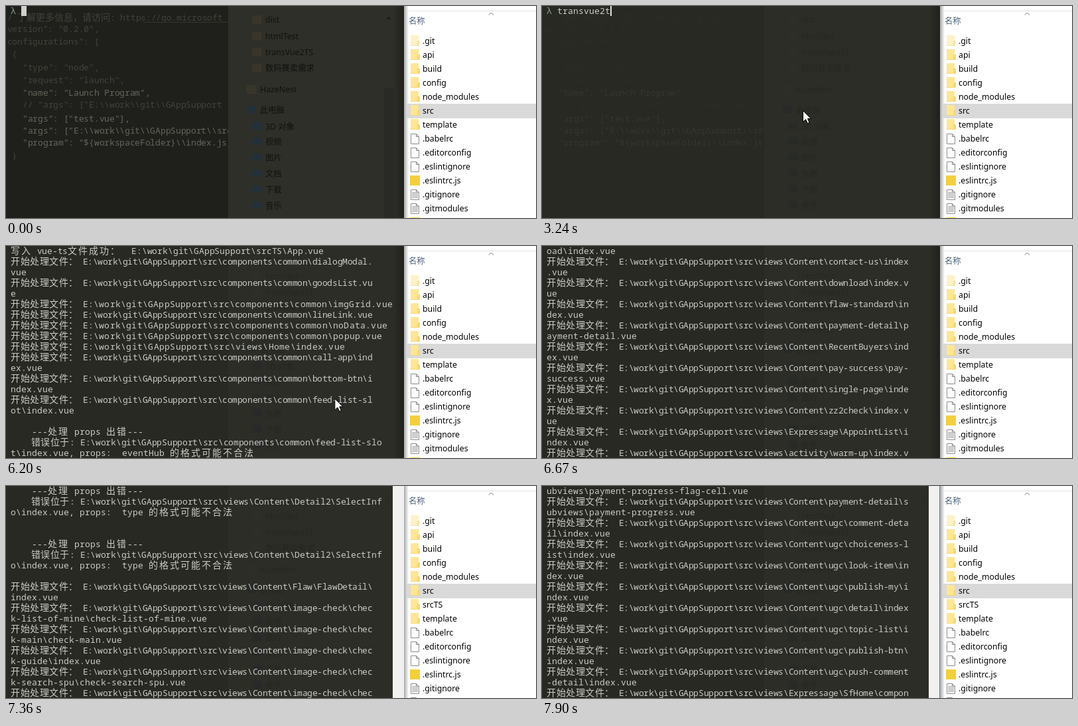
Write an HTML page with a canvas that moves like this. It is 799 px wide and 319 px high and loops after 7990 ms.

```html
<!DOCTYPE html>
<html lang="zh">
<head>
<meta charset="utf-8">
<style>
html, body { margin: 0; width: 100%; height: 100%; overflow: hidden; background: #fff; }
canvas { display: block; }
</style>
</head>
<body>
<canvas id="stage" width="799" height="319"></canvas>
<script>
const ctx = document.getElementById('stage').getContext('2d');
const LOOP = 7990, LEFT = 7, ROW = 16, CELL = 8, COLUMNS = 73;
const MONO = '13px "Noto Sans Mono", monospace';
const HAN = '14px "Noto Sans CJK SC", "Noto Sans CJK", sans-serif';
const UI = '12.3px "Noto Sans", "Noto Sans CJK SC", sans-serif';

function rect(color, x, y, w, h) { ctx.fillStyle = color; ctx.fillRect(x, y, w, h); }
function text(string, x, y, color, font) {
  ctx.font = font;
  ctx.fillStyle = color;
  ctx.fillText(string, x, y);
}
function shape(points, fill, stroke) {
  ctx.beginPath();
  points.forEach(([x, y]) => ctx.lineTo(x, y));
  ctx.closePath();
  if (fill) { ctx.fillStyle = fill; ctx.fill(); }
  if (stroke) { ctx.strokeStyle = stroke; ctx.lineWidth = 1; ctx.stroke(); }
}

// ---- Terminal log ----
const ROOT = 'E:\\work\\git\\GAppSupport\\src';
const isWide = c => c.charCodeAt(0) > 0x2000;
const cellsOf = s => [...s].reduce((n, c) => n + (isWide(c) ? 2 : 1), 0);
const lines = ['λ transvue2ts ' + ROOT];
const marks = [[-1, 4]];

function print(string) {
  let row = '';
  for (const c of string) {
    if (cellsOf(row + c) > COLUMNS) { lines.push(row); row = ''; }
    row += c;
  }
  lines.push(row);
}
const processFile = path => print(`开始处理文件： ${ROOT}\\${path}`);
const inContent = path => processFile('views\\Content\\' + path);
function propsError(path, prop) {
  print('');
  print('    ---处理 props 出错---');
  print(`    错误位于: ${ROOT}\\${path}, props:  ${prop} 的格式可能不合法`);
}
// The newest line on screen at the given output step.
const mark = step => marks.push([step, lines.length - (lines.at(-1).includes('props:') ? 1 : 2)]);

print('');
processFile('App.vue');
print('');
print('');
print(`写入 vue-ts文件成功： ${ROOT}TS\\App.vue`);
['dialogModal', 'goodsList', 'imgGrid', 'lineLink', 'noData', 'popup']
  .forEach(n => processFile(`components\\common\\${n}.vue`));
processFile('views\\Home\\index.vue');
['call-app', 'bottom-btn', 'feed-list-slot']
  .forEach(n => processFile(`components\\common\\${n}\\index.vue`));
propsError('components\\common\\feed-list-slot\\index.vue', 'eventHub');
mark(4);

print('');
['image-view', 'nav-header', 'price-panel', 'share-dialog', 'swiper-item', 'tab-switch']
  .forEach(n => processFile(`components\\common\\${n}\\index.vue`));
['about-rules', 'buyer-notice', 'check-report', 'mobile-app-download', 'contact-us', 'download', 'flaw-standard']
  .forEach(n => inContent(n + '\\index.vue'));
inContent('payment-detail\\payment-detail.vue');
inContent('RecentBuyers\\index.vue');
inContent('pay-success\\pay-success.vue');
inContent('single-page\\index.vue');
inContent('zz2check\\index.vue');
processFile('views\\Expressage\\AppointList\\index.vue');
processFile('views\\activity\\warm-up\\index.vue');
mark(10);

for (const dir of ['activity\\new-user', 'Expressage\\Detail', 'Content\\Detail2', 'Content\\Auction'])
  for (const part of ['BottomBar', 'GoodsInfo', 'PriceList', 'SelectInfo'])
    processFile(`views\\${dir}\\${part}\\index.vue`);
for (let i = 0; i < 2; i++) {
  propsError('views\\Content\\Detail2\\SelectInfo\\index.vue', 'type');
  print('');
}
inContent('Flaw\\FlawDetail\\index.vue');
['check-list-of-mine\\check-list-of-mine', 'check-main\\check-main', 'check-guide\\index',
 'check-search-spu\\check-search-spu', 'check-result\\check-result']
  .forEach(n => inContent(`image-check\\${n}.vue`));
mark(19);

['check-upload', 'check-history', 'check-detail', 'check-share', 'check-rule']
  .forEach(n => inContent(`image-check\\${n}\\index.vue`));
['header', 'footer', 'progress-flag-cell', 'progress']
  .forEach(n => inContent(`payment-detail\\subviews\\payment-${n}.vue`));
['comment-detail', 'choiceness-list', 'look-item', 'publish-my', 'detail', 'topic-list', 'publish-btn', 'push-comment-detail']
  .forEach(n => inContent(`ugc\\${n}\\index.vue`));
processFile('views\\Expressage\\SfHome\\components\\index.vue');
mark(26);

// ---- Terminal text layout ----
// Rows with a file path are spaced loosely: x of the path, pitch when the row is full, pitch of Han glyphs.
const LOOSE = { 开始: [115.5, 7.53, 14.5], 错误: [112, 7.7, 14.5], 写入: [189, 7.7, 16] };

function glyphs(string, x, baseline, pitch, widePitch, color = '#c9ccc5') {
  for (const c of string) {
    text(c, Math.round(x), baseline, color, isWide(c) ? HAN : MONO);
    x += isWide(c) ? widePitch : pitch;
  }
}
function drawLine(string, y) {
  const baseline = y + 12;
  const loose = LOOSE[string.trim().slice(0, 2)];
  if (!loose) return glyphs(string, LEFT, baseline, CELL, 2 * CELL);
  const [pathX, fullPitch, hanPitch] = loose;
  const at = string.indexOf('E:'), path = string.slice(at), cells = cellsOf(string);
  const pitch = cells === COLUMNS ? fullPitch : (LEFT + cells * CELL - pathX) / path.length;
  glyphs(string.slice(0, at), LEFT, baseline, 7.7, hanPitch);
  glyphs(path, pathX, baseline, pitch, hanPitch);
}

// ---- Windows seen through the terminal ----
const EDITOR = [
  [-6, 22, '// 了解更多信息，请访问: https://go.microsoft'], [-6, 39, '"version": "0.2.0",'],
  [-6, 58, '"configurations": ['], [9, 77, '{'], [25, 97, '"type": "node",'],
  [25, 116, '"request": "launch",'], [25, 135, '"name": "Launch Program",', 1],
  [25, 153, '// "args": ["E:\\\\work\\\\git\\\\GAppSupport'], [25, 174, '"args": ["test.vue"],', 1],
  [25, 192, '"args": ["E:\\\\work\\\\git\\\\GAppSupport\\\\src', 1],
  [25, 210, '"program": "${workspaceFolder}\\\\index.js', 1], [9, 230, '}']
];
const TREE = [
  [391, 20, 'dist'], [391, 45, 'htmlTest'], [391, 69, 'transVue2TS'], [391, 93, '数码赛卖需求'],
  [383, 125, 'HazeNest'], [383, 156, '此电脑'], [391, 181, '3D 对象'], [391, 204, '视频'],
  [391, 228, '图片'], [391, 252, '文档'], [391, 276, '下载'], [391, 300, '音乐']
];

function drawBackdrop(active, covered) {
  rect(active ? '#282923' : '#1f201b', 0, 0, 335, 319);
  rect(active ? '#2c2d27' : '#2e2f29', 335, 0, 265, 319);
  if (!covered) {
    ctx.save();
    ctx.beginPath();
    ctx.rect(0, 0, 335, 319);
    ctx.clip();
    for (const [x, y, string, bright] of EDITOR) {
      const color = active ? (bright ? '#35362f' : '#2c2d27') : (bright ? '#64655c' : '#41423b');
      glyphs(string, x, y, 7.7, 14, color);
    }
    if (!active) rect('#35362f', 207, 24, 128, 1);
    ctx.restore();
  }
  TREE.forEach(([x, y, label], i) => {
    const icon = active ? (i < 5 ? '#2d2e28' : '#282a28') : (i < 5 ? '#38362a' : '#22303a');
    rect(icon, x - 20, y - 6, 14, i < 5 ? 13 : 11);
    text(label, x, y + 5, active ? '#262722' : '#11120e', UI);
  });
  if (!active) rect('#292a25', 570, 124, 15, 195);
  shape([[573, 20], [577, 16], [581, 20]], active ? '#292a24' : '#1c1d18');
  const edge = ctx.createLinearGradient(584, 0, 600, 0);
  edge.addColorStop(0, '#20211c00');
  edge.addColorStop(1, '#20211c');
  rect(edge, 584, 0, 16, 319);
}

// ---- File list ----
const FOLDERS = ['.git', 'api', 'build', 'config', 'node_modules', 'src', 'template'];
const FILES = ['.babelrc', '.editorconfig', '.eslintignore', '.eslintrc.js', '.gitignore', '.gitmodules', '.postcssrc.js'];

function folderIcon(x, y) {
  rect('#ffe694', x, y, 12, 16);
  rect('#f5d671', x, y + 15, 12, 1);
  shape([[x + 10, y + 8], [x + 14, y + 8], [x + 14, y + 16], [x + 10, y + 16]], '#f8d872');
}
function pageIcon(x, y, lined) {
  shape([[x + .5, y + .5], [x + 8.5, y + .5], [x + 12.5, y + 4.5], [x + 12.5, y + 15.5], [x + .5, y + 15.5]], '#fdfdfd', '#8c8c8c');
  shape([[x + 8.5, y + .5], [x + 8.5, y + 4.5], [x + 12.5, y + 4.5]], '#e4e4e4', '#8c8c8c');
  if (lined) for (let i = 4; i < 14; i += 2) rect('#a3a3a3', x + 2, y + i, i < 6 ? 6 : 9, 1);
}
function drawFiles(converted) {
  rect('#fff', 600, 0, 199, 319);
  rect('#e6e6e6', 600, 7, 199, 1);
  const shadow = ctx.createLinearGradient(600, 0, 607, 0);
  shadow.addColorStop(0, '#a8a8a8');
  shadow.addColorStop(1, '#ffffff');
  rect(shadow, 600, 0, 7, 319);
  ctx.strokeStyle = '#777';
  ctx.lineWidth = 1;
  ctx.beginPath();
  ctx.moveTo(728, 13.5);
  ctx.lineTo(731.5, 10);
  ctx.lineTo(735, 13.5);
  ctx.stroke();
  text('名称', 607, 27, '#4c607a', UI);

  const folders = converted ? FOLDERS.toSpliced(6, 0, 'srcTS') : FOLDERS;
  [...folders, ...FILES].forEach((name, i) => {
    const y = 53 + 21 * i;
    if (name === 'src') rect('#d9d9d9', 604, y - 11, 195, 22);
    if (i < folders.length) {
      ctx.globalAlpha = name === '.git' ? .5 : 1;
      folderIcon(610, y - 9);
      ctx.globalAlpha = 1;
    } else if (name.endsWith('.js')) rect('#f2cf3b', 609, y - 8, 15, 15);
    else pageIcon(610, y - 8, name.startsWith('.git'));
    text(name, 628, y + 4, '#000', UI);
  });
}

// ---- Timeline ----
const KEYS = [1070, 1220, 1300, 1470, 1610, 2140, 2230, 2320, 3010, 3240, 3470, 3700];
const FOCUS = 370, PASTE = 4490, ENTER = 5180, OUTPUT = 5580, SCROLL = 5892, STEP = 77;
const CONVERTED = 6970, SCROLLBAR = 7050, BORDER = 7435;

function path(points, t) {
  for (let i = 1; i < points.length; i++) {
    const a = points[i - 1], b = points[i];
    if (t <= b[0]) {
      const k = Math.max(0, (t - a[0]) / (b[0] - a[0]));
      return a.slice(1).map((v, j) => v + (b[j + 1] - v) * k);
    }
  }
  return points.at(-1).slice(1);
}
function drawPointer(t) {
  const [x, y] = path([[70, 632, 322], [FOCUS, 393, 157], [5820, 393, 157], [6200, 495, 229], [6450, 568, 322]], t);
  const outline = [[0, 0], [0, 17], [4, 13], [7, 19], [9.5, 18], [7, 12], [12, 12]];
  shape(outline.map(([dx, dy]) => [x + .5 + dx, y + .5 + dy]), '#fff', '#000');
}
function drawCaret(t, x, y, lastChange) {
  if (t - lastChange < 530) rect('#e4e4de', x, y, 2, 15);
}
function drawTerminal(t) {
  if (t < OUTPUT) {
    const typed = t >= PASTE ? lines[0].length : 2 + KEYS.filter(k => t >= k).length;
    glyphs('λ', LEFT, 12, CELL, CELL, '#8a9c96');
    glyphs(lines[0].slice(2, typed), LEFT + 2 * CELL, 12, CELL, CELL);
    if (t < FOCUS) rect('#d0d0d0', 23, 0, 8, 15);
    else if (t >= ENTER) drawCaret(t, LEFT, ROW, ENTER);
    else drawCaret(t, LEFT + typed * CELL, 0, Math.max(...[FOCUS, ...KEYS, PASTE].filter(k => t >= k)));
    return;
  }
  const bottom = t < SCROLL
    ? Math.min(4, 2 + Math.floor((t - OUTPUT) / 75))
    : Math.floor(path(marks, Math.floor((t - SCROLL) / STEP))[0]);
  const top = Math.max(0, bottom - 19);
  for (let i = top; i <= bottom; i++) drawLine(lines[i], (i - top) * ROW);
  rect('#e4e4de', LEFT, (bottom + 1 - top) * ROW, 2, 15);
  if (t >= SCROLLBAR) rect('#f0f0f0', 583, 0, 17, 319);
  if (t >= BORDER) rect('#3c8fd0', 599, 0, 1, 319);
}
function draw(now) {
  const t = now % LOOP;
  drawBackdrop(t >= FOCUS, t >= SCROLL);
  drawTerminal(t);
  drawFiles(t >= CONVERTED);
  if (t >= 70) drawPointer(t);
  requestAnimationFrame(draw);
}
requestAnimationFrame(draw);
</script>
</body>
</html>
```
